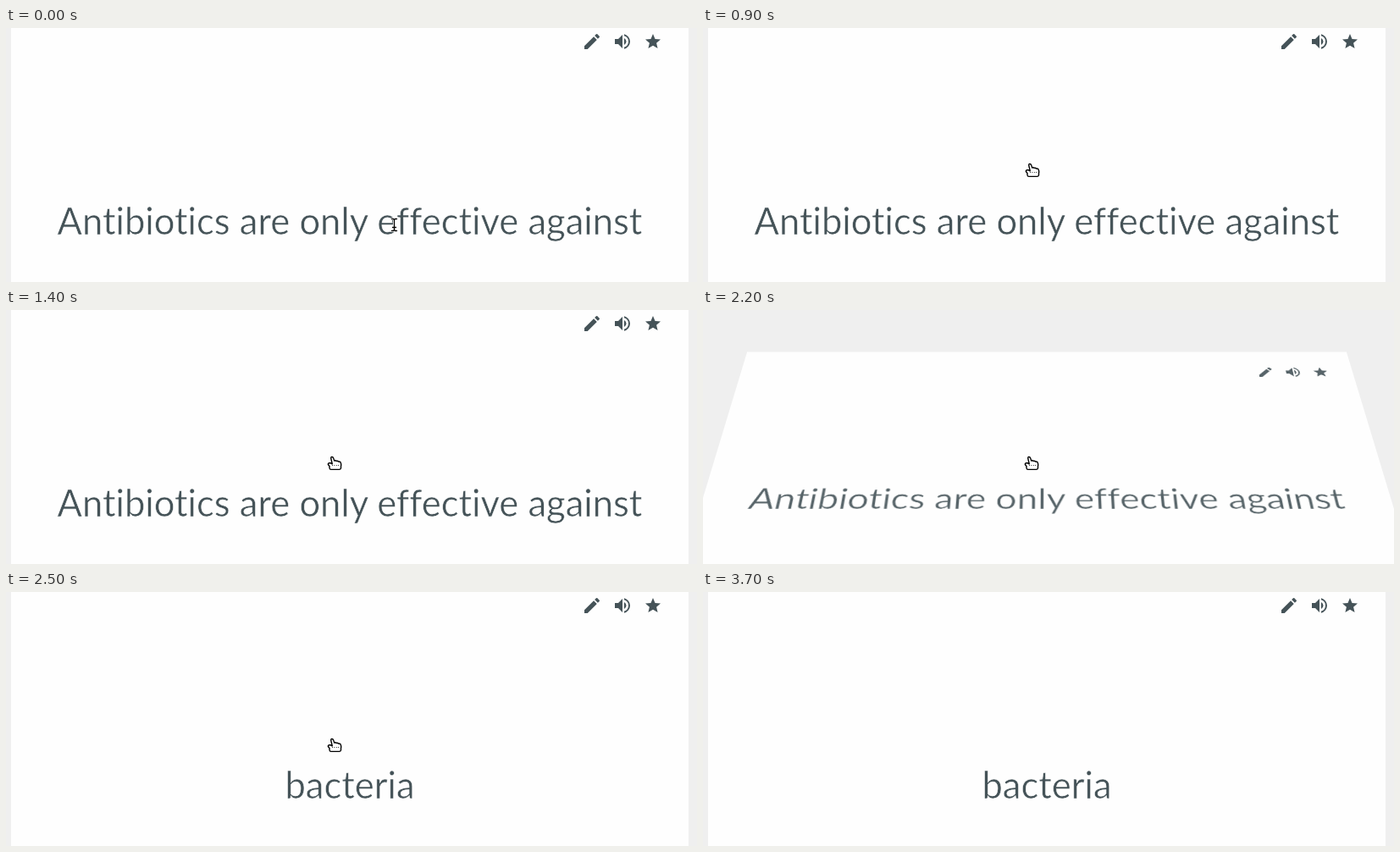
These frames come from a looping animation (816 by 300 pixels, 4.2 s). An HTML page:

```html
<!DOCTYPE html>
<html lang="en">
<head>
<meta charset="utf-8">
<title>Flashcard</title>
<style>
  html, body { margin: 0; width: 100%; height: 100%; overflow: hidden; background: #efefef; }
  #stage { position: relative; width: 100%; height: 100%; overflow: clip; contain: strict; }
  svg { position: absolute; left: 0; top: 0; }
  #card { left: 6px; top: -23px; background: #fefefe; fill: #455358; }
  #card text {
    font: 43.5px Lato, sans-serif; font-variant-ligatures: none; text-anchor: middle;
    stroke: #fefefe; stroke-width: .6px; /* thins the letters */
  }
  #hand, #beam { fill: #fff; stroke: #000; stroke-linejoin: round; stroke-linecap: round; }
</style>
</head>
<body>
<div id="stage">
  <svg id="card" width="800" height="450">
    <g id="face">
      <path transform="translate(674 27)" d="M3 17.25V21h3.75L17.81 9.94l-3.75-3.75zM20.71 7.04a1 1 0 0 0 0-1.41l-2.34-2.34a1 1 0 0 0-1.41 0l-1.83 1.83 3.75 3.75z"/>
      <path transform="translate(710 27)" d="M3 9v6h4l5 5V4L7 9zM16.5 12A4.5 4.5 0 0 0 14 7.97v8.05A4.5 4.5 0 0 0 16.5 12zM14 3.23v2.06a7 7 0 0 1 0 13.42v2.06a9 9 0 0 0 0-17.54z"/>
      <path transform="translate(747.2 28.2) scale(.9)" d="M12 17.27 18.18 21l-1.64-7.03L22 9.24l-7.19-.61L12 2 9.19 8.63 2 9.24l5.46 4.73L5.82 21z"/>
      <text id="words" x="400" y="267"></text>
    </g>
  </svg>
  <svg width="816" height="300">
    <defs>
      <path id="bar" fill="none" d="M-3-7H-1L0-6 1-7H3M0-6V6M-3 7H-1L0 6 1 7H3M-2 3H2"/>
    </defs>
    <g id="beam">
      <use href="#bar" stroke="#fff" stroke-width="3"/>
      <use href="#bar" stroke-width="1.3"/>
    </g>
    <g id="hand">
      <path stroke-width="1.4" d="M5.8 9.3 4.3 3Q4 1.1 5.3 1T7.2 2.4L8.2 5.6Q9.6 4.9 10.6 5.9 12.1 5.3 13 6.5 15.6 6.3 16 8.4 16.5 10.5 16 12.5V14.4Q15.6 15.9 14 15.9H4.4Q2.7 15.9 2.5 14V12L.9 10Q.7 8.3 2.4 8.3H4L5.6 9.3"/>
      <path stroke-width="1" stroke-dasharray="0 2.4" d="M6 11H14"/>
    </g>
  </svg>
</div>
<script>
  const $ = id => document.getElementById(id);
  const card = $("card"), face = $("face"), words = $("words"), hand = $("hand"), beam = $("beam");
  const LOOP = 4200, STEP = 100;
  const smooth = p => p * p * (3 - 2 * p);
  const progress = (t, from, to) => smooth(Math.min(1, Math.max(0, (t - from) / (to - from))));

  // Tilt of the card in degrees; the back shows past 90
  function tilt(t) {
    if (t < 2200) return 0;
    return [40, 110, 167][(t - 2200) / STEP] ?? 180;
  }

  // Hot spot of the pointer, or null when it is off the stage
  function pointer(t) {
    if (t >= 3700) return null;
    if (t >= 3600) return [403, 7];
    if (t >= 3500) return [401, 19];
    const rise = progress(t, 400, 900), drop = progress(t, 1000, 1400);
    return [458 - 73 * rise - drop, 232 - 72 * rise + 13 * drop];
  }

  function place(el, shown, x, y) {
    el.style.display = shown ? "" : "none";
    if (shown) el.setAttribute("transform", `translate(${Math.round(x) + 0.5} ${Math.round(y) + 0.5})`);
  }

  function draw(now) {
    const t = Math.floor(now % LOOP / STEP) * STEP;
    const angle = tilt(t), back = angle > 90, turning = angle % 180 !== 0;
    card.style.transform = turning ? `perspective(1110px) rotateX(${back ? angle - 180 : angle}deg)` : "none";
    face.style.opacity = turning ? 0.9 : 1;
    words.textContent = back ? "bacteria" : "Antibiotics are only effective against";

    const spot = pointer(t), [x, y] = spot || [0, 0];
    const overText = y > 212;
    place(beam, spot && overText, x, y);
    place(hand, spot && !overText, x - 5.5, y - 1.5);
    requestAnimationFrame(draw);
  }
  requestAnimationFrame(draw);
</script>
</body>
</html>
```
